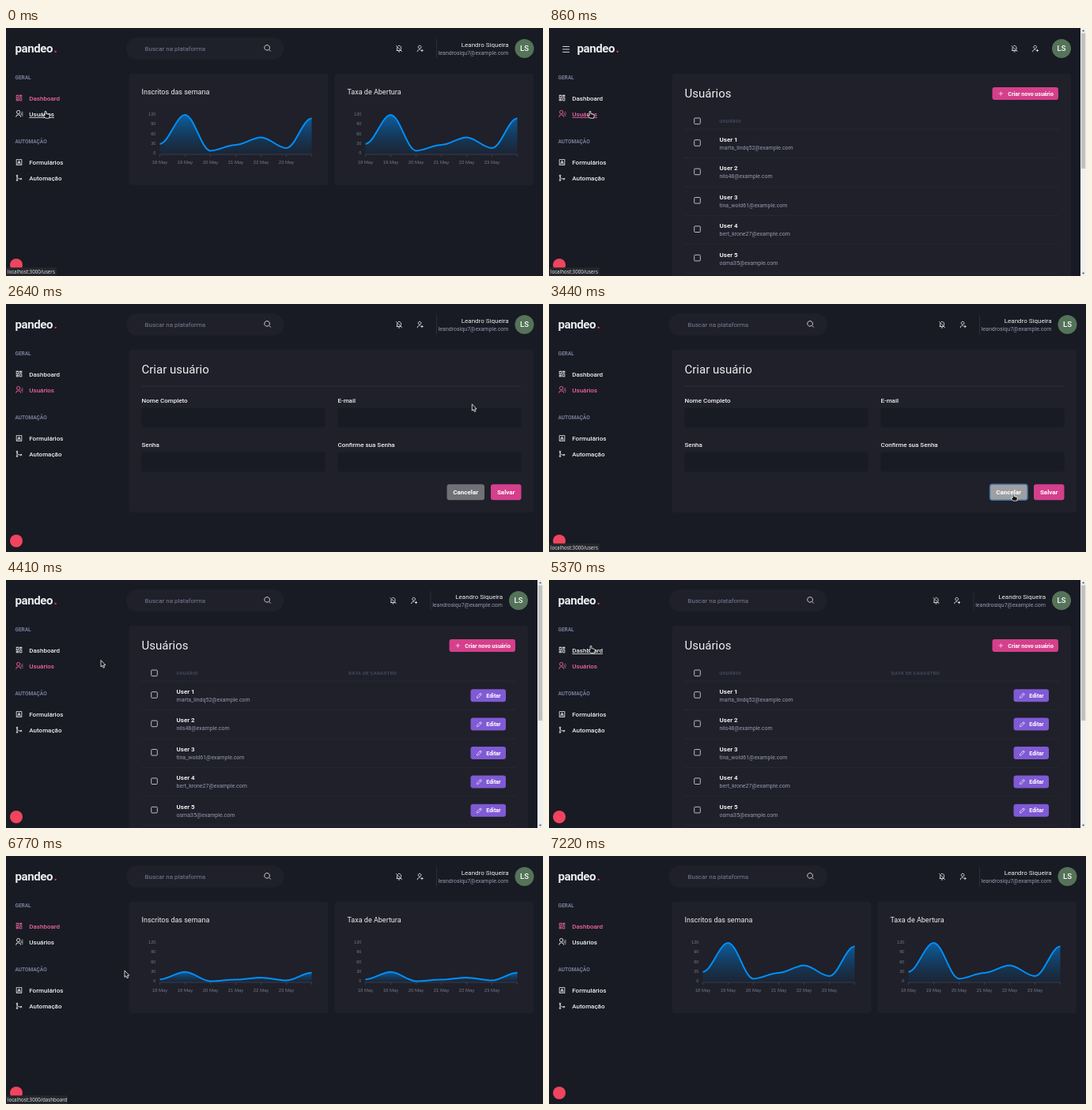
An HTML page that plays this animation: 679 px wide and 314 px high, repeating every 7690 ms.

```html
<!DOCTYPE html>
<html lang="pt-BR">
<head>
<meta charset="utf-8">
<title>Painel</title>
<style>
html, body { margin: 0; width: 100%; height: 100%; overflow: hidden; background: #181b23; }
svg { display: block; }
#stage { width: 100vw; height: 100vh; font-family: Roboto, sans-serif; }
</style>
</head>
<body>
<svg id="stage" viewBox="0 0 679 314"></svg>
<script>
const LOOP = 7690;
const C = {
  bg: '#181b23', card: '#1f2029', line: '#2d2f3c', axis: '#4b4d63', label: '#757889',
  muted: '#797d9a', soft: '#9699b0', text: '#eeeef2',
  pink: '#d53f8c', link: '#ed64a6', purple: '#805ad5', ring: '#3f82c2'
};

// Markup helpers; text is placed by the middle of its capitals
const text = (x, y, s, size, o = {}) =>
  `<text x="${x}" y="${y + size * 0.355}" font-size="${size}" fill="${o.fill || C.text}"` +
  ` font-weight="${o.w || 400}" text-anchor="${o.a || 'start'}"` +
  `${o.font ? ` font-family="${o.font}"` : ''}${o.ls ? ` letter-spacing="${o.ls}"` : ''}` +
  `${o.id ? ` id="${o.id}"` : ''}>${s}</text>`;
const rect = (x, y, w, h, r, fill, extra = '') =>
  `<rect x="${x}" y="${y}" width="${w}" height="${h}" rx="${r}" fill="${fill}" ${extra}/>`;
const hline = (x1, x2, y, color) => `<path d="M${x1} ${y}H${x2}" stroke="${color}" stroke-width=".6"/>`;
const group = (id, s) => `<g id="${id}">${s}</g>`;

// 24-unit icons
const solid = {
  dash: 'M13 21V11h8v10h-8zM3 13V3h8v10H3zm6-2V5H5v6h4zM3 21v-6h8v6H3zm2-2h4v-2H5v2zm10 0h4v-6h-4v6zM13 3h8v6h-8V3zm2 2v2h4V5h-4z',
  users: 'M19 7h5v2h-5V7zm-2 5h7v2h-7v-2zm3 5h4v2h-4v-2zM2 22a8 8 0 1 1 16 0h-2a6 6 0 1 0-12 0H2zm8-9c-3.3 0-6-2.7-6-6s2.7-6 6-6 6 2.7 6 6-2.7 6-6 6zm0-2c2.2 0 4-1.8 4-4s-1.8-4-4-4-4 1.8-4 4 1.8 4 4 4z',
  form: 'M5 5v14h14V5H5zM4 3h16a1 1 0 0 1 1 1v16a1 1 0 0 1-1 1H4a1 1 0 0 1-1-1V4a1 1 0 0 1 1-1zm5.9 12l-.8 2H6.8L11 7h2l4.2 10H15l-.9-2H9.9zm.8-2h2.6L12 9.8 10.7 13z'
};
const stroked = {
  merge: 'M6 3a2 2 0 1 0 .01 0M6 17a2 2 0 1 0 .01 0M18 13a2 2 0 1 0 .01 0M6 7v10M6 7c0 6 5 8 10 8',
  bell: 'M6 8v10h13M9 4c4-2 9 0 9 6v5M4 18h4M9.5 21.5h5M3 3l18 18',
  add: 'M11 3a4.5 4.5 0 1 0 .01 0M4 22a7 7 0 0 1 9-7M18 14v8M14 18h8',
  search: 'M11 3a8 8 0 1 0 .01 0M17 17l5 5',
  menu: 'M2 4h20M2 12h20M2 20h20',
  plus: 'M12 5v14M5 12h14',
  pencil: 'M4 20v-4L16 4l4 4L8 20zM13.5 6.5l4 4'
};
const icon = (name, cx, cy, size = 10, color = C.text, id = '') => {
  const paint = solid[name]
    ? `fill="${color}"`
    : `fill="none" stroke="${color}" stroke-width="2"`;
  return `<path ${id && `id="${id}"`} d="${solid[name] || stroked[name]}" ${paint}` +
    ` transform="translate(${cx - size / 2} ${cy - size / 2}) scale(${size / 24})"/>`;
};

function header(id, right, wide) {
  const logoX = wide ? 11.5 : 35.5;
  let s = text(logoX, 25.7, 'pandeo', 15, { w: 700, ls: -0.375 }) +
    text(logoX + 49, 25.7, '.', 15, { w: 700, fill: C.pink });
  const bell = wide ? right - 170.5 : right - 71.5;
  s += icon('bell', bell, 26, 10) + icon('add', bell + 26.5, 26, 10);
  if (wide) {
    s += rect(152, 12, 199.5, 28, 14, C.card) +
      text(175.5, 25.7, 'Buscar na plataforma', 8, { fill: C.muted }) +
      icon('search', 330.5, 25.3, 10) +
      `<path d="M${right - 123} 14V38.5" stroke="#353646" stroke-width=".7"/>` +
      text(right - 32, 21, 'Leandro Siqueira', 8, { a: 'end' }) +
      text(right - 32, 32, 'leandrosiqu7@example.com', 7, { a: 'end', fill: C.soft });
  } else {
    s += icon('menu', 21.5, 27, 10.5);
  }
  s += `<circle cx="${right - 12}" cy="26" r="12" fill="#557358"/>` +
    text(right - 12, 26, 'LS', 9.6, { w: 500, a: 'middle', fill: '#fff' });
  return group(id, s);
}

function navItem(id, name, label, y) {
  return icon(name, 16.5, y - 0.4, 10, C.text, id + 'Icon') +
    text(29.3, y + 0.2, label, 8, { w: 500, id });
}

function sidebar() {
  const head = { w: 700, fill: C.muted };
  return text(11.5, 62.7, 'GERAL', 6.5, head) + text(11.5, 144, 'AUTOMAÇÃO', 6.5, head) +
    navItem('dash', 'dash', 'Dashboard', 89) + navItem('usr', 'users', 'Usuários', 109) +
    navItem('form', 'form', 'Formulários', 170.3) + navItem('auto', 'merge', 'Automação', 190.3) +
    rect(11.2, 83.2, 58, 13, 0, 'none', `id="ringDash" stroke="${C.ring}" stroke-width="1.3"`) +
    rect(11.2, 103.2, 51, 13, 0, 'none', `id="ringUsr" stroke="${C.ring}" stroke-width="1.3"`);
}

const BASE = 159.5, STEP = 32;
const visits = [31, 120, 10, 28, 51, 18, 109];

function chartCard(x, title) {
  const font = "'Liberation Sans', Arial, sans-serif";
  const left = x + 39;
  let s = rect(x, 57.8, 252, 141.2, 4, C.card) + text(x + 16, 81, title, 9);
  for (let v = 0; v <= 120; v += 30)
    s += text(x + 33.8, 158.3 - v * 0.4105, v, 5.5, { a: 'end', fill: C.label, font });
  s += hline(left, left + 6 * STEP, BASE + 0.5, C.axis);
  visits.forEach((_, i) => {
    const px = left + i * STEP;
    s += `<path d="M${px} 160v3" stroke="${C.axis}" stroke-width=".6"/>`;
    if (i < 6) s += text(px, 169.7, `${18 + i} May`, 6, { a: 'middle', fill: C.label, font });
  });
  return s + `<g transform="translate(${left})"><path class="area" fill="url(#fade)"/>` +
    `<path class="curve" fill="none" stroke="#008ffb" stroke-width="2"/></g>`;
}

function curvePath(rise) {
  const y = v => BASE - v * 0.4125 * rise;
  return visits.map((v, i) => {
    if (!i) return `M0 ${y(v)}`;
    const x = i * STEP, k = STEP * 0.35;
    return `C${x - STEP + k} ${y(visits[i - 1])} ${x - k} ${y(v)} ${x} ${y(v)}`;
  }).join('');
}

const mails = ['marta_lindq52@example.com', 'nils48@example.com', 'tina_wold61@example.com',
  'bert_krone27@example.com', 'osma35@example.com'];

const checkbox = y =>
  rect(183.7, y - 3.8, 7.6, 7.6, 1, 'none', 'stroke="#b9bac4" stroke-width="1"');

function usersPage() {
  const th = { w: 700, fill: '#454a62', ls: 0.3 };
  let s = rect(155.5, 57.8, 504.5, 270, 4, C.card) + text(171.5, 83, 'Usuários', 15) +
    rect(560.5, 75, 83.5, 16, 3, C.pink, 'id="create"') +
    icon('plus', 571.3, 83, 9) +
    text(580.3, 83.2, 'Criar novo usuário', 7, { w: 700, fill: '#fff' }) +
    checkbox(117.8) + text(215.5, 118, 'USUÁRIO', 6, th) + hline(171.5, 644, 128, C.line);
  let wide = text(433, 118, 'DATA DE CADASTRO', 6, th);
  mails.forEach((mail, i) => {
    const y = 145.5 + i * 36.4;
    s += checkbox(y) + text(215.5, y - 4.3, `User ${i + 1}`, 8, { w: 700 }) +
      text(215.5, y + 6, mail, 7, { fill: C.soft }) + hline(171.5, 644, y + 19, C.line);
    wide += rect(587.5, y - 7.3, 44.5, 16, 3, C.purple) + icon('pencil', 598.5, y + 0.7, 9) +
      text(607.3, y + 0.9, 'Editar', 7, { w: 700, fill: '#fff' });
  });
  const bar = rect(672, 0, 7, 314, 0, '#f1f1f1') + rect(673, 6.5, 5.2, 171.5, 0, '#c1c1c1') +
    '<path d="M673.8 4.3h3.6l-1.8-2z" fill="#505050"/><path d="M673.8 309.7h3.6l-1.8 2z" fill="#505050"/>';
  return s + group('usersWide', wide) + bar;
}

function createPage() {
  const field = (x, y, label) => text(x, y, label, 8, { w: 500 }) +
    rect(x, y + 9.8, 232, 24.5, 3, C.bg);
  return rect(155.5, 57.8, 512, 206.5, 4, C.card) + text(171.5, 83, 'Criar usuário', 15) +
    hline(171.5, 651.5, 104, '#353646') +
    field(171.5, 122, 'Nome Completo') + field(419.5, 122, 'E-mail') +
    field(171.5, 178, 'Senha') + field(419.5, 178, 'Confirme sua Senha') +
    rect(557.5, 228.2, 47.5, 20, 3, '#fff', 'id="cancel"') +
    text(581.2, 238.3, 'Cancelar', 8, { w: 700, a: 'middle', fill: '#fff' }) +
    rect(613, 228.2, 38.5, 20, 3, C.pink) +
    text(632.2, 238.3, 'Salvar', 8, { w: 700, a: 'middle', fill: '#fff' });
}

const stage = document.getElementById('stage');
stage.innerHTML =
  `<defs><linearGradient id="fade" x1="0" y1="0" x2="0" y2="1">
    <stop offset="0" stop-color="#008ffb" stop-opacity=".58"/>
    <stop offset="1" stop-color="#00528f" stop-opacity=".12"/></linearGradient></defs>` +
  rect(0, 0, 679, 314, 0, C.bg) + sidebar() +
  group('dashboard', chartCard(155.5, 'Inscritos das semana') + chartCard(415.5, 'Taxa de Abertura')) +
  group('users', usersPage()) + group('newUser', createPage()) +
  header('headFull', 667.5, true) + header('headBar', 660, true) + header('headNarrow', 660, false) +
  '<circle cx="13" cy="300" r="8" fill="#f0445f"/>' +
  group('status', rect(-3, 303.2, 10, 14, 2, '#25272c', 'id="statusBox"') +
    text(1.8, 309.2, '', 6.2, { fill: '#dfe0e3', font: "'Noto Sans', sans-serif", id: 'statusText' })) +
  `<g id="cursor" fill="#111" stroke="#fff" stroke-width=".8" stroke-linejoin="round">
    <path id="arrow" d="M0 0V8.4L1.9 6.8 3.1 9.7 4.6 9 3.4 6.2H5.8Z"/>
    <path id="hand" d="M-.9.8Q0-.4.9.8V3.6L4.3 4.4Q5.5 4.8 5.2 6.2L4.6 9.2H-.2L-3 5.8Q-2.6 4.6-.9 5.8Z"/></g>`;

const $ = id => document.getElementById(id);
const show = (id, on) => $(id).setAttribute('visibility', on ? 'visible' : 'hidden');
const set = (id, attrs) => { for (const k in attrs) $(id).setAttribute(k, attrs[k]); };
const within = (t, a, b) => t >= a && t < b;

// Pointer legs: first step, last step, number of steps, end point
const legs = [
  [450, 670, 6, 52, 105], [1390, 1470, 2, 120, 106], [1610, 1940, 4, 589, 83],
  [2440, 3110, 7, 590, 236], [3220, 3440, 3, 587, 240], [3910, 4410, 6, 120, 101.5],
  [4510, 4510, 1, 100, 97], [4610, 4910, 4, 53, 83], [5110, 5190, 2, 54, 82],
  [5370, 5370, 1, 53, 83], [5910, 6120, 3, 56, 89], [6660, 6770, 2, 150, 145],
  [6910, 7120, 3, 400, 290]
];

function pointer(t) {
  let x = 50, y = 105;
  for (const [from, to, n, ex, ey] of legs) {
    if (t < from) break;
    const k = t >= to ? n : 1 + Math.floor((t - from) / (to - from) * (n - 1));
    x += (ex - x) * k / n;
    y += (ey - y) * k / n;
  }
  return [x, y];
}

function statusAt(t) {
  if (t < 1390 || within(t, 3220, 3910)) return ['users', 64];
  if (within(t, 1940, 2440)) return ['users/create', 85];
  if (within(t, 6260, 6910)) return ['dashboard', 78];
  return null;
}

function riseAt(t) {
  if (t < 6370) return 1;
  const k = [6660, 6770, 6910, 7010, 7120, 7220].filter(s => t >= s).length / 6;
  return k * k * (3 - 2 * k);
}

function render(t) {
  const page = t < 860 || t >= 6370 ? 'dashboard' : within(t, 2170, 3810) ? 'newUser' : 'users';
  const narrow = within(t, 860, 940);
  for (const p of ['dashboard', 'users', 'newUser']) $(p).style.display = p === page ? '' : 'none';
  show('usersWide', !narrow);
  const head = narrow ? 'headNarrow' : page === 'users' ? 'headBar' : 'headFull';
  for (const h of ['headFull', 'headBar', 'headNarrow']) show(h, h === head);

  const overUsr = t < 1390, overCreate = within(t, 1940, 2170);
  const overCancel = within(t, 3110, 3810), overDash = within(t, 4910, 6660);
  const home = page === 'dashboard';
  const paint = (id, on, over) => {
    const fill = on ? C.link : C.text;
    set(id, { fill, 'text-decoration': over ? 'underline' : 'none' });
    set(id + 'Icon', { fill });
  };
  paint('dash', home, overDash);
  paint('usr', !home, overUsr);
  show('ringUsr', within(t, 450, 860));
  show('ringDash', within(t, 6120, 6370));

  const pressed = within(t, 2040, 2170), cancelled = within(t, 3440, 3810);
  const focus = on => ({ stroke: on ? '#4577a8' : 'none', 'stroke-width': 1.4 });
  set('create', { fill: pressed ? '#9b2870' : overCreate ? '#b83280' : C.pink, ...focus(pressed) });
  set('cancel', { 'fill-opacity': cancelled ? 0.57 : overCancel ? 0.48 : 0.36, ...focus(cancelled) });

  if (home) {
    const d = curvePath(riseAt(t));
    stage.querySelectorAll('.curve').forEach(p => p.setAttribute('d', d));
    stage.querySelectorAll('.area').forEach(p => p.setAttribute('d', `${d}V${BASE}H0Z`));
  }

  const status = statusAt(t);
  show('status', status);
  if (status) {
    $('statusText').textContent = 'localhost:3000/' + status[0];
    set('statusBox', { width: status[1] + 3 });
  }

  const hand = overUsr || overCreate || overCancel || overDash;
  const [x, y] = pointer(t);
  set('cursor', { transform: `translate(${x} ${y})` });
  $('cursor').style.display = t < 7220 ? '' : 'none';
  show('hand', hand);
  show('arrow', !hand);
}

const start = performance.now();
function tick() {
  render((performance.now() - start) % LOOP);
  requestAnimationFrame(tick);
}
tick();
</script>
</body>
</html>
```
